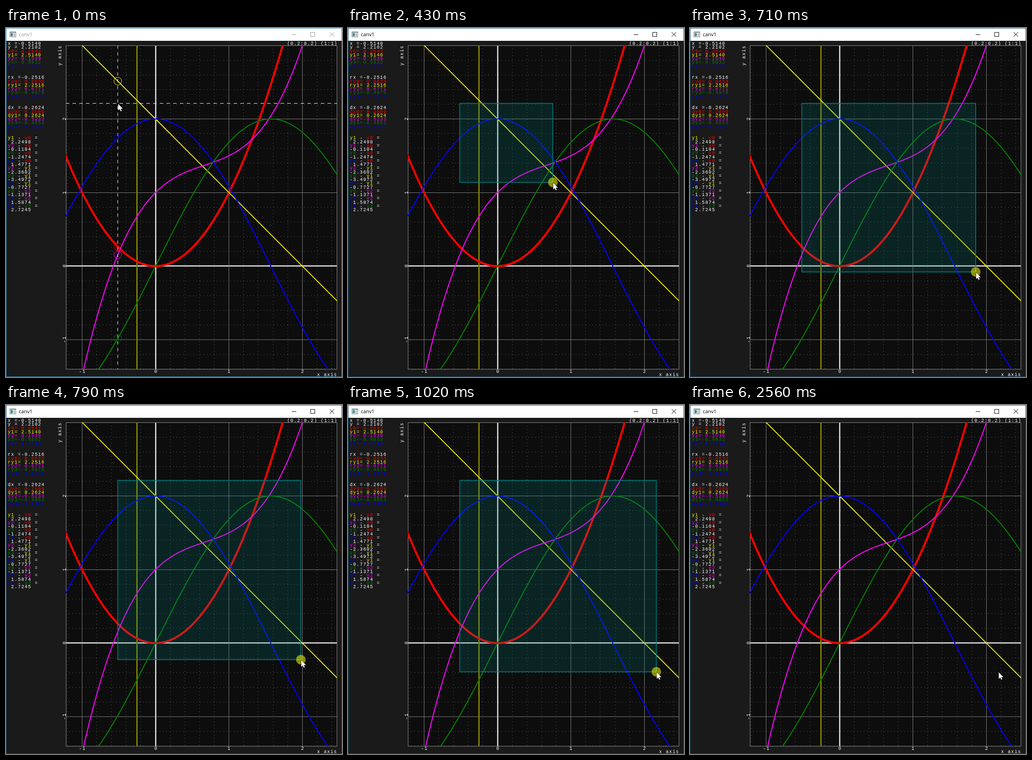
An HTML page with a canvas that plays this animation: 735 by 762 pixels, repeating every 3.49 s.

```html
<!DOCTYPE html>
<html lang="en">
<head>
<meta charset="utf-8">
<title>canv1</title>
<style>
html, body { margin: 0; width: 100%; height: 100%; overflow: hidden; background: #1a1a1a; }
canvas { display: block; }
</style>
</head>
<body>
<canvas id="stage" width="735" height="762"></canvas>
<script>
const ctx = document.getElementById('stage').getContext('2d');
const LOOP = 3490, PRESS = 200, ZOOM = 1350, RESET = 2560;
const L = 131, T = 38, R = 724, B = 745;            // plot area
const FULL = { x: 327.1, y: 519.9, sx: 160.6, sy: 160.65 };
const CLOSE = { x: 245, y: 638.8, sx: 221.5, sy: 271.5 };
const PX = -0.514, REF = -0.2516;
const ADVANCE = 7.36;
const DOTS = [0.92, 6.42], DASHES = [7.34, 7.34];

const curves = [
  { f: x => x * x, color: '#f00', width: 4.5 },
  { f: x => 2 - x, color: '#ff0', width: 1.8 },
  { f: x => 1 + x - x * x + x ** 3 / 2, color: '#f0f', width: 2.2 },
  { f: x => 2 * Math.sin(x), color: '#008000', width: 2.2 },
  { f: x => 2 * Math.cos(x), color: '#00f', width: 2.2 }
];

// Drag path: time, x, y of the moving corner
const path = [[200, 244.5, 164.5], [430, 448, 337], [560, 563, 456], [790, 645, 556], [1020, 674.5, 582.5]];
const ticks = [200, 250, 300, 350, 380, 430, 480, 560, 610, 660, 710, 740, 790, 840, 890, 940, 1020];
const [, startX, startY] = path[0];

const snap = v => Math.floor(v) + 0.5;

function rect(x, y, w, h, color) {
  ctx.fillStyle = color;
  ctx.fillRect(x, y, w, h);
}

function line(x1, y1, x2, y2, color, width = 1, dash = []) {
  ctx.strokeStyle = color;
  ctx.lineWidth = width;
  ctx.setLineDash(dash);
  ctx.beginPath();
  ctx.moveTo(x1, y1);
  ctx.lineTo(x2, y2);
  ctx.stroke();
  ctx.setLineDash([]);
}

function circle(x, y, r) {
  ctx.beginPath();
  ctx.arc(x, y, r, 0, 7);
}

function text(s, x, y, color = '#fff', turned = false) {
  ctx.save();
  ctx.font = '10px "Liberation Mono", monospace';
  ctx.letterSpacing = '1.36px';
  ctx.fillStyle = color;
  ctx.translate(x, y);
  if (turned) ctx.rotate(-Math.PI / 2);
  ctx.fillText(s, 0, 0);
  ctx.restore();
}

// Monotone cubic through the path points
function cornerAt(t) {
  const now = ticks.filter(k => k <= t).pop();
  const i = Math.min(path.findLastIndex(p => p[0] <= now), path.length - 2);
  const slope = (j, a) => j < 0 || j > path.length - 2 ? 0 :
    (path[j + 1][a] - path[j][a]) / (path[j + 1][0] - path[j][0]);
  const tangent = (j, a) => {
    const p = slope(j - 1, a), q = slope(j, a);
    return p * q > 0 ? 2 * p * q / (p + q) : 0;
  };
  const h = path[i + 1][0] - path[i][0], u = (now - path[i][0]) / h;
  return [1, 2].map(a =>
    path[i][a] + (path[i + 1][a] - path[i][a]) * u * u * (3 - 2 * u) +
    h * u * (1 - u) * (tangent(i, a) * (1 - u) - tangent(i + 1, a) * u));
}

function drawWindow(active) {
  const edge = active ? '#1b5678' : '#3f93c6', ink = active ? '#000' : '#999';
  rect(0, 0, 735, 762, edge);
  rect(1, 1, 733, 27, '#fff');
  rect(1, 28, 733, 733, '#1a1a1a');
  rect(8, 8, 14, 12, '#777');
  rect(9, 10, 12, 9, '#fff');
  rect(10, 11, 5, 7, '#3c8f8a');
  rect(16, 11, 4, 7, '#b8c4cc');
  ctx.font = '11px "Open Sans", "Noto Sans", sans-serif';
  ctx.fillStyle = ink;
  ctx.fillText('canv1', 28, 18);
  line(625, 14.5, 635, 14.5, ink);
  ctx.strokeRect(666.5, 9.5, 9, 9);
  line(708, 9, 718, 19, ink);
  line(718, 9, 708, 19, ink);
}

function drawReadout() {
  const row = (n, s, color, col = 0) => text(s, 4 + col * ADVANCE, 37 + n * 8.25, color);
  const block = (n, head, name, values) => {
    row(n, head);
    values.forEach((v, i) => row(n + 1 + i, `${name}${i}=${v}`, curves[i].color));
  };
  row(0, 'x =-0.5140');
  block(1, 'y = 2.2102', 'y', [' 0.2642', ' 2.5140', ' 0.1539', '-0.9832', ' 1.7413']);
  block(9, 'rx =-0.2516', 'ry', [' 0.0633', ' 2.2516', ' 0.6771', '-0.4979', ' 1.9370']);
  block(17, 'dx =-0.2624', 'dy', [' 0.2009', ' 0.2624', '-0.5233', '-0.4853', '-0.1957']);
  const diffs = [' 2.2498', '-0.1104', '-1.2474', ' 1.4771', '-2.3602',
    '-3.4972', '-0.7727', '-1.1371', ' 1.5874', ' 2.7245'];
  let n = 25;
  for (let b = 0; b < 4; b++) for (let a = b + 1; a < 5; a++) {
    row(n, 'y' + a, curves[a].color);
    row(n, '-', '#fff', 3);
    row(n, 'y' + b, curves[b].color, 5);
    row(n, '=', '#fff', 8);
    row(n + 1, diffs[(n - 25) / 2]);
    n += 2;
  }
  text('(0.2:0.2) (1:1)', 615, 37);
  text('x axis', 680.5, 760);
  text('y axis', 121, 82, '#fff', true);
}

function drawPlot(v) {
  const X = x => v.x + x * v.sx, Y = y => v.y - y * v.sy;
  const inX = p => p > L && p < R, inY = p => p > T && p < B;
  rect(L, T, R - L, B - T, '#0d0d0d');

  for (let i = -10; i < 20; i++) {
    if (i % 5 === 0) continue;
    const x = snap(X(i / 5)), y = snap(Y(i / 5));
    if (inX(x)) line(x, T, x, B, '#909090', 1, DOTS);
    if (inY(y)) line(L, y, R, y, '#909090', 1, DOTS);
  }
  for (let i = -1; i < 3; i++) {
    const x = snap(X(i)), y = snap(Y(i)), s = String(i), half = s.length * ADVANCE / 2 - 0.7;
    const color = i ? '#808080' : '#c8c8c8', width = i ? 1 : 3;
    if (inX(x)) {
      line(x, T, x, B, color, width);
      text(s, x - half, 753);
    }
    if (inY(y)) {
      line(L, y, R, y, color, width);
      text(s, 130.5, y + half, '#fff', true);
    }
  }
  ctx.strokeStyle = '#909090';
  ctx.lineWidth = 1;
  ctx.strokeRect(L + 0.5, T + 0.5, R - L - 0.5, B - T - 0.5);

  ctx.save();
  ctx.beginPath();
  ctx.rect(L, T, R - L, B - T);
  ctx.clip();
  line(snap(X(REF)), T, snap(X(REF)), B, '#808000', 3);
  for (const c of curves) {
    ctx.strokeStyle = c.color;
    ctx.lineWidth = c.width;
    ctx.beginPath();
    for (let p = L - 4; p <= R + 4; p += 2) ctx.lineTo(p, Y(c.f((p - v.x) / v.sx)));
    ctx.stroke();
  }
  ctx.restore();
}

function drawCrosshair() {
  line(startX, T, startX, B, '#fff', 1, DASHES);
  line(L, startY, R, startY, '#fff', 1, DASHES);
  for (const c of curves) {
    ctx.strokeStyle = c.color;
    circle(startX, FULL.y - c.f(PX) * FULL.sy, 8.5);
    ctx.stroke();
  }
}

function drawSelection(x, y) {
  const box = [startX, startY, x - startX, y - startY];
  rect(...box, 'rgba(0,128,128,.2)');
  ctx.strokeStyle = '#008080';
  ctx.lineWidth = 1.6;
  ctx.strokeRect(...box);
  ctx.fillStyle = 'rgba(255,255,0,.52)';
  circle(x, y, 10.5);
  ctx.fill();
}

const arrow = new Path2D('M.5 .5V16L4 12.8L6.4 18L8.8 17L6.5 11.8H11.5Z');

function drawCursor(x, y) {
  ctx.save();
  ctx.translate(x + 0.5, y + 0.8);
  ctx.scale(0.92, 0.92);
  ctx.fillStyle = '#fff';
  ctx.strokeStyle = '#000';
  ctx.lineWidth = 1;
  ctx.stroke(arrow);
  ctx.fill(arrow);
  ctx.restore();
}

function draw(t) {
  drawWindow(t >= PRESS);
  drawReadout();
  drawPlot(t >= ZOOM && t < RESET ? CLOSE : FULL);
  const [x, y] = t < PRESS ? [startX, startY] : cornerAt(t);
  if (t < PRESS) drawCrosshair();
  else if (t < ZOOM) drawSelection(x, y);
  drawCursor(x, y);
}

const start = performance.now();
function tick() {
  draw((performance.now() - start) % LOOP);
  requestAnimationFrame(tick);
}
tick();
</script>
</body>
</html>
```
